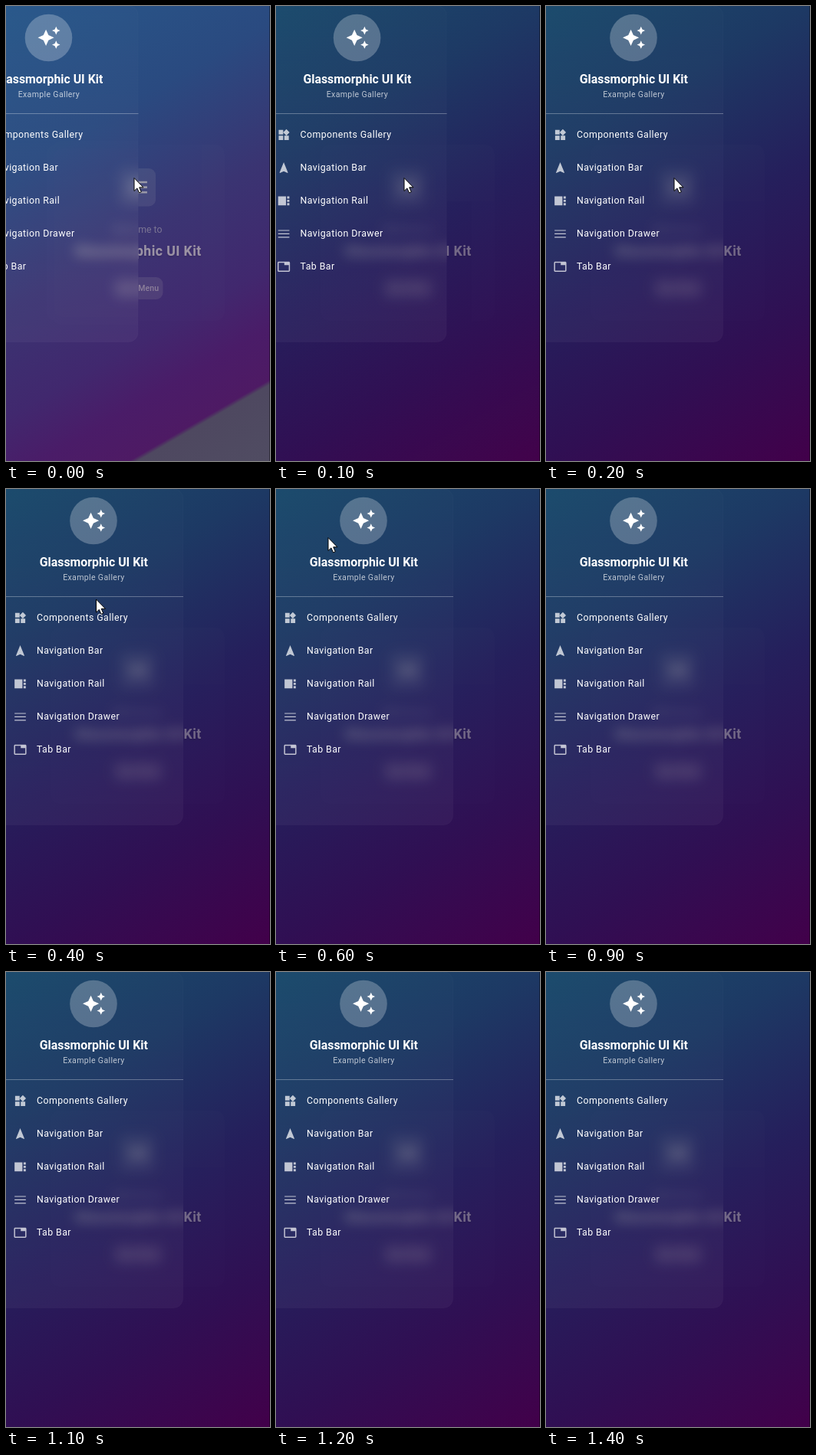
An HTML page that plays this animation: 344 by 594 pixels, repeating every 1.5 s.

```html
<!DOCTYPE html>
<html lang="en">
<head>
<meta charset="utf-8">
<title>Glass drawer</title>
<style>
  html, body { margin: 0; width: 100%; height: 100%; overflow: hidden; background: #241f5a; }
  svg { display: block; width: 344px; height: 594px; }
  text { font-family: Roboto, sans-serif; }
  .mid { text-anchor: middle; }
  .item { font-size: 12.32px; letter-spacing: .44px; }
</style>
</head>
<body>
<svg viewBox="0 0 344 594" xmlns="http://www.w3.org/2000/svg">
  <defs>
    <linearGradient id="dim" gradientUnits="userSpaceOnUse" x1="0" y1="0" x2="344" y2="594">
      <stop offset="0" stop-color="#1a4a6c"/>
      <stop offset=".25" stop-color="#1d3964"/>
      <stop offset=".5" stop-color="#251f5c"/>
      <stop offset=".75" stop-color="#300f53"/>
      <stop offset="1" stop-color="#42004a"/>
    </linearGradient>
    <linearGradient id="lit" gradientUnits="userSpaceOnUse" x1="0" y1="0" x2="344" y2="594">
      <stop offset="0" stop-color="#28588a"/>
      <stop offset=".28" stop-color="#2a4a80"/>
      <stop offset=".5" stop-color="#3a3472"/>
      <stop offset=".68" stop-color="#41286e"/>
      <stop offset=".78" stop-color="#4a1c68"/>
      <stop offset=".866" stop-color="#4e1a64"/>
      <stop offset=".874" stop-color="#4e4860"/>
      <stop offset="1" stop-color="#504c62"/>
    </linearGradient>
    <linearGradient id="glass" x1="0" y1="0" x2="0" y2="1">
      <stop offset="0" stop-color="#fff" stop-opacity=".008"/>
      <stop offset="1" stop-color="#fff" stop-opacity=".04"/>
    </linearGradient>
    <filter id="blur" filterUnits="userSpaceOnUse" x="0" y="130" width="344" height="330">
      <feGaussianBlur stdDeviation="8"/>
    </filter>
    <filter id="shade" filterUnits="userSpaceOnUse" x="60" y="290" width="230" height="60">
      <feDropShadow dx="0" dy="1.8" stdDeviation="1.8" flood-color="#000" flood-opacity=".3"/>
    </filter>
    <clipPath id="inside"><rect id="insideBox" y="0" width="400" height="438.500" rx="12"/></clipPath>
    <clipPath id="outside"><rect id="outsideBox" y="0" width="344" height="594"/></clipPath>
    <g id="page" fill="#ebe6cf">
      <rect x="58" y="181" width="227" height="230" rx="12" fill-opacity=".015"/>
      <rect x="147" y="212" width="48" height="49.500" rx="9" fill-opacity=".15"/>
      <path transform="translate(156.200 220.800) scale(1.32)" fill-opacity=".9" d="M3 18h18v-2H3v2zm0-5h18v-2H3v2zm0-7v2h18V6H3z"/>
      <text class="mid" x="171" y="296" font-size="12.32" fill-opacity=".6">Welcome to</text>
      <text class="mid" x="172.200" y="326" font-size="17.6" font-weight="700" letter-spacing=".44" fill-opacity=".9" filter="url(#shade)">Glassmorphic UI Kit</text>
      <rect x="139.500" y="354" width="65" height="29" rx="9" fill-opacity=".16"/>
      <text class="mid" x="172" y="372" font-size="10.56" font-weight="500" fill-opacity=".7">Open Menu</text>
    </g>
  </defs>

  <rect width="344" height="594" fill="url(#dim)"/>
  <rect id="glow" width="344" height="594" fill="url(#lit)"/>

  <g clip-path="url(#outside)"><use class="content" href="#page"/></g>
  <g clip-path="url(#inside)"><g filter="url(#blur)"><use class="content" href="#page"/></g></g>

  <g id="drawer" fill="#fff">
    <rect x="-100" y="0" width="330.500" height="438.500" rx="12" fill="url(#glass)" stroke="#fff" stroke-opacity=".02"/>
    <circle cx="114" cy="41.500" r="30.800" fill-opacity=".25"/>
    <path transform="translate(98.700 25.500) scale(1.32)" d="M19 9l1.250-2.750L23 5l-2.750-1.250L19 1l-1.250 2.750L15 5l2.750 1.250L19 9zM11.500 9.500L9 4 6.500 9.500 1 12l5.500 2.500L9 20l2.500-5.500L17 12zM19 15l-1.250 2.750L15 19l2.750 1.250L19 23l1.250-2.750L23 19l-2.750-1.250z"/>
    <text class="mid" x="114.300" y="101" font-size="15.84" font-weight="700">Glassmorphic UI Kit</text>
    <text class="mid" x="114.400" y="118.500" font-size="10.56" letter-spacing=".35" fill-opacity=".7">Example Gallery</text>
    <rect x="-60" y="140" width="291" height="1" fill-opacity=".3"/>
    <g id="list"></g>
  </g>

  <rect x="343" width="1" height="594" fill="#000" fill-opacity=".4"/>
  <path id="cursor" d="M0 0V17L3.900 13.400L6.500 19.400L9.300 18.200L6.700 12.300H12Z" fill="#fff" stroke="#000" stroke-width="1" stroke-linejoin="round"/>
</svg>
<script>
const LOOP = 1500, STEP = 100;
const $ = id => document.getElementById(id);
const NS = "http://www.w3.org/2000/svg";

const items = [
  ["Components Gallery", "M13 13v8h8v-8zM3 21h8v-8H3zM3 3v8h8V3zM16.66 1.69L11 7.34 16.66 13l5.66-5.66z"],
  ["Navigation Bar", "M12 2L4.500 20.290l.710.710L12 18l6.790 3 .710-.710z"],
  ["Navigation Rail", "M16 20H2V4h14zM18 8h4V4h-4zM18 20h4v-4h-4zM18 14h4v-4h-4z"],
  ["Navigation Drawer", "M2 5.200h20v1.600H2zM2 11.200h20v1.600H2zM2 17.200h20v1.600H2z"],
  ["Tab Bar", "M21 3H3c-1.100 0-2 .9-2 2v14c0 1.100.9 2 2 2h18c1.100 0 2-.9 2-2V5c0-1.100-.9-2-2-2zm0 16H3V5h10v4h8z"]
];

function add(tag, attrs, label) {
  const el = document.createElementNS(NS, tag);
  for (const key in attrs) el.setAttribute(key, attrs[key]);
  if (label) el.textContent = label;
  $("list").append(el);
}

items.forEach(([label, d], i) => {
  const y = 168 + 43 * i;
  add("path", { d, transform: `translate(9.700 ${y - 8.4}) scale(.733)`, "fill-opacity": .72 });
  add("text", { class: "item", x: 40, y: y + 4.3 }, label);
});

const clamp = v => Math.min(1, Math.max(0, v));

function draw(t) {
  const rest = Math.pow(1 - clamp(t / 200), 2.8);
  const x = -58.5 * rest, edge = 231 + x, fade = rest * rest;

  $("drawer").setAttribute("transform", `translate(${x} 0)`);
  $("insideBox").setAttribute("x", edge - 400);
  $("outsideBox").setAttribute("x", edge);
  $("glow").setAttribute("opacity", fade);
  document.querySelectorAll(".content").forEach(el => el.setAttribute("opacity", .42 + .18 * fade));

  const go = clamp((t - 200) / 400);
  $("cursor").setAttribute("transform", `translate(${167 - 99 * go} ${224.5 - 161 * go})`);
  $("cursor").setAttribute("visibility", t < 700 ? "visible" : "hidden");
}

const start = performance.now();
function tick(now) {
  const t = Math.max(0, now - start) % LOOP;
  draw(Math.floor(t / STEP) * STEP);
  requestAnimationFrame(tick);
}
draw(0);
requestAnimationFrame(tick);
</script>
</body>
</html>
```
